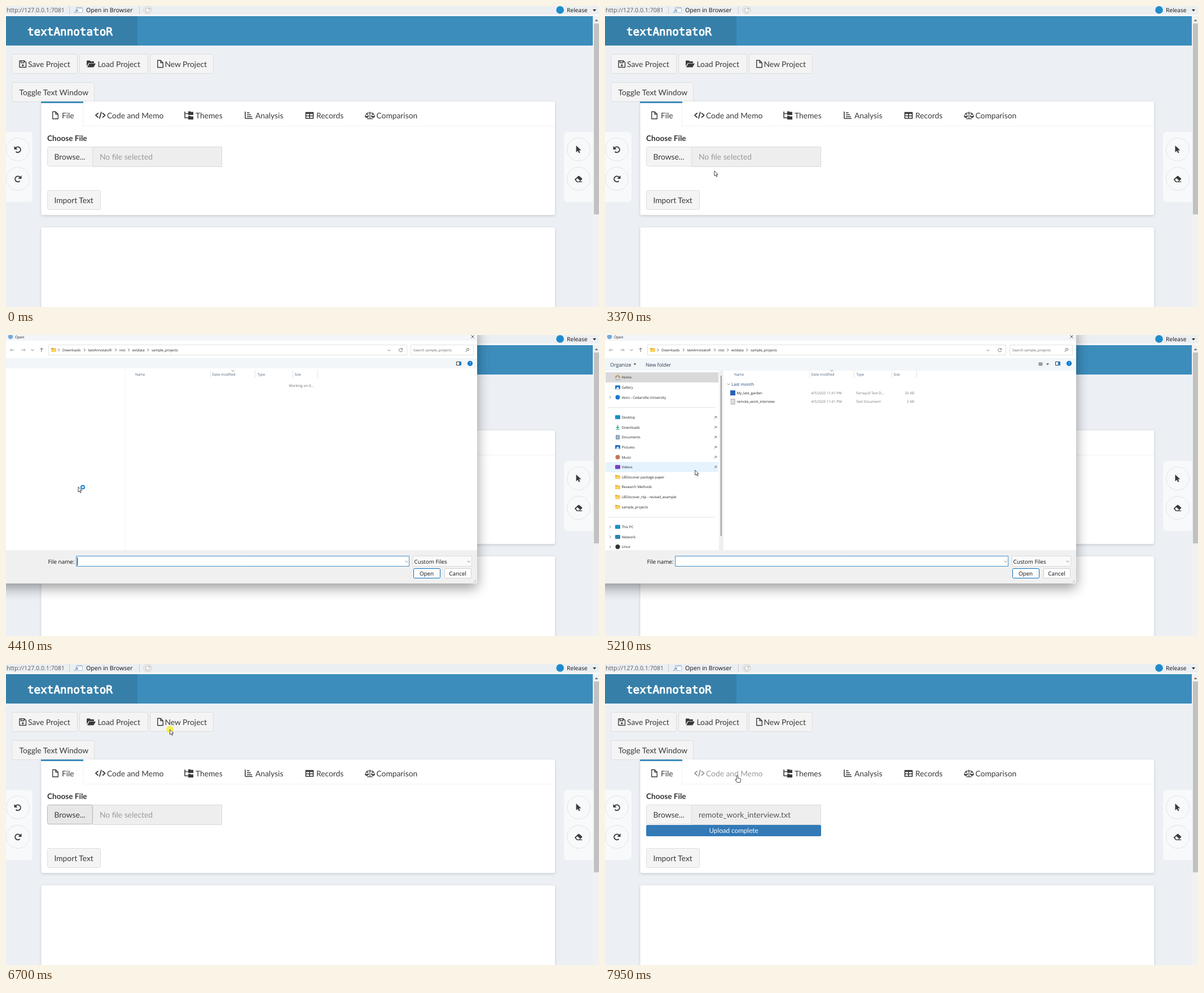
An HTML page with a canvas that plays this animation: 1051x533 px, repeating every 8 s.

```html
<!DOCTYPE html>
<html lang="en">
<head>
<meta charset="utf-8">
<title>textAnnotatoR</title>
<style>
html, body { margin: 0; width: 100%; height: 100%; overflow: hidden; background: #ecf0f5; }
canvas { display: block; width: 1051px; height: 533px; }
</style>
</head>
<body>
<canvas width="1051" height="533"></canvas>
<script>
const ctx = document.querySelector('canvas').getContext('2d');
const LOOP = 8000;
const APP = 'Lato, sans-serif', SYS = '"Open Sans", sans-serif';
const INK = '#3a3a3a', BLUE = '#3c8dbc';

// time, x, y of the pointer tip
const POINTER = [
  [1040, 1037, 526], [1510, 1037, 526], [2060, 777, 467], [2340, 657, 428], [3160, 263, 318],
  [3370, 194, 292], [3860, 128, 269], [5010, 128, 269], [5970, 279.5, 127], [6240, 290.5, 116],
  [7610, 290.5, 116], [7950, 234.5, 197]
];

const SIDEBAR = [
  ['Home', 'house', '#d9822b'], ['Gallery', 'picture', '#1d76c9'],
  ['Veno - Cedarville University', 'disc', '#1a78d0'], null,
  ['Desktop', 'screen', '#1c8fc4'], ['Downloads', 'down', '#1ba57b'], ['Documents', 'sheet', '#7c93ad'],
  ['Pictures', 'picture', '#1d76c9'], ['Music', 'disc', '#c4775c'], ['Videos', 'screen', '#7a3fc0'],
  ['LBDiscover package paper', 'folder'], ['Research Methods', 'folder'],
  ['LBDiscover_nlp - revised_example', 'folder'], ['sample_projects', 'folder'], null,
  ['This PC', 'screen', '#1c8fc4'], ['Network', 'screen', '#2b82b5'], ['Linux', 'disc', '#333']
];

function box(x, y, w, h, fill, stroke, r = 0) {
  ctx.beginPath();
  ctx.roundRect(x, y, w, h, r);
  if (fill) { ctx.fillStyle = fill; ctx.fill(); }
  if (stroke) { ctx.strokeStyle = stroke; ctx.lineWidth = 1; ctx.stroke(); }
}
const disc = (x, y, r, fill, stroke) => box(x - r, y - r, 2 * r, 2 * r, fill, stroke, r);

function text(s, x, y, size = 13.8, color = INK, font = APP, align = 'left', weight = '') {
  ctx.font = `${weight} ${size}px ${font}`;
  ctx.fillStyle = color;
  ctx.textAlign = align;
  ctx.fillText(s, x, y);
}
const sys = (s, x, y, size = 6.2, color = '#222', align) => text(s, x, y, size, color, SYS, align);

function at(x, y, draw) {
  ctx.save();
  ctx.translate(x, y);
  draw();
  ctx.restore();
}
function fill(d, color = INK) {
  ctx.fillStyle = color;
  ctx.fill(new Path2D(d));
}
function line(d, width = 1.4, color = INK) {
  ctx.strokeStyle = color;
  ctx.lineWidth = width;
  ctx.stroke(new Path2D(d));
}
function shadowed(color, blur, dy, draw) {
  ctx.save();
  ctx.shadowColor = color;
  ctx.shadowBlur = blur;
  ctx.shadowOffsetY = dy;
  draw();
  ctx.restore();
}

function button(x, y, w, label, labelX, hot) {
  box(x + .5, y + .5, w - 1, 34, hot ? '#e7e7e7' : '#f4f4f4', hot ? '#b5b5b5' : '#ddd', 3);
  text(label, labelX, y + 22.5);
}
const fileIcon = (x, y) => at(x, y, () => line('M.7.7H6l4.3 4.2V13.3H.7zM6 .7V5h4.3'));

function pointerAt(t) {
  if (t < POINTER[0][0]) return null;
  const i = POINTER.findIndex(k => k[0] > t);
  if (i < 0) return POINTER.at(-1).slice(1);
  const [t0, x0, y0] = POINTER[i - 1], [t1, x1, y1] = POINTER[i];
  const p = (t - t0) / (t1 - t0);
  return [x0 + (x1 - x0) * p, y0 + (y1 - y0) * p];
}
const inside = (p, x, y, w, h) => p && p[0] >= x && p[0] < x + w && p[1] >= y && p[1] < y + h;

function toolbar() {
  box(0, 0, 1051, 18, '#f7f8f9');
  box(0, 0, 1051, 15, '#eceff2');
  sys('http://127.0.0.1:7081', 1, 11, 10.6, '#555');
  sys('Open in Browser', 142, 11, 10.6, '#111');
  box(112, 0, 1, 14, '#c8ccd0');
  box(236, 0, 1, 14, '#c8ccd0');
  box(124.5, 2.5, 11, 9, '#fff', '#aebfd0', 1);
  box(125, 3, 10, 2, '#c5d5e5');
  line('M121 12l6-5m-3.500 0H127v3.500', 1.5, '#7fa7cc');
  disc(251, 7, 6.8, '#f8f8f8', '#c4c4c4');
  line('M254 4.500a4 4 0 1 0 1 3.500M255 3v3h-3', 1.2, '#b5b5b5');
  disc(982, 7, 6.8, '#1e8bcb');
  sys('Release', 994, 11, 10.2, '#111');
  fill('M1040 6h6l-3 3.500z', '#222');
}

function tabs(codeHot) {
  box(62, 169, 75, 3, BLUE);
  box(136, 172, 1, 41, '#f2f2f2');
  box(137, 212, 836, 1, '#f2f2f2');
  fileIcon(82, 186.5);
  text('File', 99, 198.5);
  const ink = codeHot ? '#999' : INK;
  line('M163.500 189.500l-4.500 4 4.500 4M171 189.500l4.500 4-4.500 4M169 187.500l-3.300 12', 1.8, ink);
  text('Code and Memo', 179, 198.5, 13.8, ink);
  line('M317 187v11h6M317 190.500h6', 1.6);
  fill('M323 186.500h3.500l1 1h4.500v5.500h-9zM323 194.500h3.500l1 1h4.500v5.500h-9z');
  text('Themes', 336, 198.5);
  line('M424 187v11q0 1.200 1.200 1.200H437M427 189h4.500M427 192.500h7M427 196h9', 1.6);
  text('Analysis', 442, 198.5);
  line('M531.500 188.500h13v10.500h-13zM538 189v10M531 194.500h14', 1.7);
  fill('M531 188h14v3h-14z');
  text('Records', 550, 198.5);
  line('M645 187v12.500M640 199.700h10M639.500 189.500h11M636.700 195l2.900-5 2.900 5M647.500 195l2.900-5 2.900 5', 1.2);
  fill('M636 195h7q-.5 3-3.500 3t-3.500-3zM647 195h7q-.5 3-3.500 3t-3.500-3z');
  text('Comparison', 656.5, 198.5);
}

function sideTools() {
  box(-6, 223, 53, 124, '#f8f9fa', null, 6);
  box(989, 223, 57, 124, '#f8f9fa', null, 6);
  box(1040, 18, 11, 515, '#f1f1f1');
  box(1042, 31, 9, 338, '#c1c1c1');
  fill('M1043.500 27l3-3.500 3 3.500z', '#777');
  for (const x of [21, 1015]) for (const y of [254, 306]) disc(x, y, 20.5, '#f8f9fa', '#e2e4e6');
  const turn = () => {
    line('M-4.500-2A5 5 0 1 1-3.500 4', 1.8);
    fill('M-6.500-6v6h6z');
  };
  at(21, 254, turn);
  at(21, 306, () => { ctx.scale(-1, 1); turn(); });
  fill('M1010.500 247v12l3-2.600 2 4.200 2-1-2-4h4z');
  fill('M1008.300 306.500l6-5.500q.8-.7 1.600 0l5 4.300q.8.800 0 1.600l-4 3.800h4.300v1.400h-9.500l-3.500-4q-.7-.8.100-1.600z');
  fill('M1010 307.500l2.700-2.500 4.600 4-1.800 1.700h-2.800z', '#f8f9fa');
}

function page(t, p) {
  box(0, 0, 1051, 533, '#ecf0f5');
  toolbar();
  box(0, 18, 1040, 52, BLUE);
  box(0, 18, 233, 52, '#367fa9');
  text('textAnnotatoR', 38, 51.5, 19.3, '#fff', '"DejaVu Sans Mono", monospace');
  ctx.strokeStyle = '#fff';
  ctx.lineWidth = 1;
  ctx.strokeText('textAnnotatoR', 38, 51.5);

  const back = t >= 6870;
  button(10, 85, 117, 'Save Project', 39);
  line('M24 97h8.500l3 3v8.500H24zM26.500 97v3.500h5.500V97');
  disc(29.8, 105, 1.7, INK);
  button(130, 85, 122, 'Load Project', 162.5);
  fill('M143 107v-9.500q0-1 1-1h4.500l1.700 1.500h4.800q1 0 1 1v2h-8.500q-1 0-1.500.900zM144 108.500l3.200-6q.4-.7 1.200-.7H159l-3.300 6q-.4.700-1.200.700z');
  button(255, 85, 113, 'New Project', 281.5, back && inside(p, 255, 85, 113, 35));
  fileIcon(268, 95.5);
  button(10, 135, 147, 'Toggle Text Window', 23.5);

  for (const [y, h] of [[169, 201], [392, 160]])
    shadowed('rgba(0,0,0,.16)', 5, 1.5, () => box(62.5, y, 910.5, h, '#fff', null, 3));
  tabs(back && inside(p, 147, 172, 141, 40));

  text('Choose File', 73, 238.5, 13.6, '#333', APP, 'left', 'bold');
  box(153.5, 249.5, 229, 35, '#eee', '#d6d9de');
  const pressed = !back && (t >= 4000 || inside(p, 73, 250, 81, 35));
  button(73, 249, 81, 'Browse...', 85.5, pressed);
  if (back) {
    text('remote_work_interview.txt', 166, 271.5, 13.8, '#555');
    const u = Math.min(1, (t - 6870) / 600), w = 310 * (1 - (1 - u) ** 3);
    box(73, 285, 310, 20, '#f5f5f5', null, 3);
    ctx.save();
    ctx.beginPath();
    ctx.rect(73, 285, w, 20);
    ctx.clip();
    box(73, 285, 310, 20, '#337ab7', null, 2);
    text('Upload complete', 73 + w / 2, 299, 11.7, '#fff', APP, 'center');
    ctx.restore();
  } else {
    text('No file selected', 166, 271.5, 13.8, '#999');
  }
  button(73, 326, 95, 'Import Text', 85.5);
  sideTools();
}

function smallIcon(kind, x, y, color) {
  at(x, y, () => {
    if (kind === 'folder') {
      fill('M-4.500-3.500h3.500l1 1h4.500v6h-9z', '#e0a526');
      fill('M-4.500-1.500h9v5h-9z', '#fbd160');
    } else if (kind === 'disc') disc(0, 0, 4, color);
    else if (kind === 'house') {
      box(-3, -.5, 6, 4.5, '#e8e8e8', '#8b98a5');
      line('M-4.500 0L0-4 4.500 0', 1.3, color);
    } else if (kind === 'down') line('M0-4v6M-2.500-.5L0 2l2.500-2.500M-3.500 4h7', 1.2, color);
    else if (kind === 'sheet') {
      box(-3.5, -4, 7, 8, color, null, 1);
      line('M-2-2h4M-2 0h4M-2 2h4', .7, '#fff');
    } else {
      box(-4.5, -3.5, 9, 7, color, null, 1);
      if (kind === 'picture') fill('M-3.500 3l3.500-4 3.500 4z', '#fff');
    }
  });
}
const chevron = (x, y, down, color = '#777') =>
  at(x, y, () => line(down ? 'M-2.500-1L0 1.300 2.500-1' : 'M-1-2.300L1.300 0-1 2.300', .9, color));

function sidebar(p) {
  box(202, 63, 8, 318, '#f0f0f0');
  box(205, 72, 1.5, 284, '#858585');
  SIDEBAR.forEach((row, i) => {
    const y = 75 + 17.65 * i;
    if (!row) return box(6, Math.round(y), 190, 1, '#e2e2e2');
    if (i === 0) box(1, 66, 200, 18, '#d9d9d9');
    else if (inside(p, 1, y - 8.8, 200, 17.6)) box(1, y - 8.8, 200, 17.6, '#e5f3ff');
    smallIcon(row[1], 22.5, y, row[2]);
    sys(row[0], 29.5, y + 2.3);
    if (i === 2 || i > 14) chevron(9, y);
    if (i > 3 && i < 10) at(196, y, () => line('M-2.500 2.500L0 0M-1.500-1.500l3 3M0-2.500L2.500 0M-.8-.8L.8-2M.8.800L2-.8', .9, '#777'));
  });
}

function fileRow(y, name, type, size, icon) {
  icon();
  sys(name, 233.5, y + 2.3);
  sys('4/5/2025 11:41 PM', 365.5, y + 2.3, 6.2, '#777');
  sys(type, 445, y + 2.3, 6.2, '#777');
  sys(size, 548, y + 2.3, 6.2, '#777', 'right');
}

function files(t, p) {
  if (t >= 6500) box(213, 110, 337, 16, '#cce8ff');
  else if (inside(p, 213, 110, 337, 16)) box(213, 110, 337, 16, '#e5f3ff');
  chevron(219, 87, true);
  sys('Last month', 224, 90, 7.6, '#24477f');
  fileRow(102.5, 'My_late_garden', 'Fernquill Text D...', '20 KB', () => box(222, 98, 9, 9, '#2b63b8'));
  fileRow(118, 'remote_work_interview', 'Text Document', '2 KB', () => {
    box(223.5, 113.5, 6.5, 9, '#fafafa', '#999');
    line('M225 116h4M225 118h4M225 120h4', .7, '#999');
  });
}

function dialog(t, p) {
  const loaded = t >= 4550;
  shadowed('rgba(0,0,0,.4)', 22, 8, () => box(-20, -20, 855, 460, '#fff', null, 4));
  box(0, 0, 835, 10, '#f3f5f8');
  disc(8, 3, 4.3, '#75aadb');
  sys('Open', 16, 5.5, 6.4);
  line('M824.500 0.500l5 5m0-5l-5 5', .9);

  line('M14.500 26.500h-7m2.500-2.500l-2.500 2.500 2.500 2.500M27 26.500h7m-2.500-2.500l2.500 2.500-2.500 2.500', .9, '#999');
  line('M63 30v-7m-2.500 2.500l2.500-2.500 2.500 2.500', .9, '#555');
  chevron(47, 26.5, true);
  box(75.5, 17.5, 635, 18, '#fff', '#e3e3e3');
  box(717.5, 17.5, 111, 18, '#fff', '#e3e3e3');
  smallIcon('folder', 84.5, 26.5);
  [['Downloads', 100], ['textAnnotatoR', 145.5], ['inst', 201], ['extdata', 224], ['sample_projects', 258]]
    .forEach(([s, x]) => { chevron(x - 6.5, 26.5, false, '#444'); sys(s, x, 29); });
  chevron(679, 27, true);
  line('M702 24.800a3 3 0 1 0 .600 2.500M702.500 23.500v2h-2', .9, '#666');
  sys('Search sample_projects', 722, 29, 6.2, '#666');
  line('M820.500 25.500a2 2 0 1 1-4 0 2 2 0 0 1 4 0M817 27.500l-2.500 2.500', .9, '#555');

  box(0, 41, 835, loaded ? 22 : 18, '#f2f6f9');
  box(798.5, 47.5, 8, 6, '#fff', '#333');
  box(803, 47, 4, 7, '#257dc0');
  disc(822.5, 50.3, 4.6, '#0878c9');
  sys('?', 822.5, 53, 7, '#fff', 'center');

  [['Name', 229], ['Date modified', 365.5], ['Type', 445.5], ['Size', 511.5]]
    .forEach(([s, x]) => sys(s, x, 72.3, 6.2, '#4c607a'));
  for (const x of [362, 441, 508, 552]) box(x, 63, 1, 13, '#e5e5e5');
  chevron(402, 63, true);

  if (loaded) {
    sys('Organize', 9, 55.5, 9, '#26374a');
    fill('M50.500 50.500h5l-2.500 2.800z', '#444');
    sys('New folder', 72, 55.5, 8.8, '#26374a');
    line('M768.500 49.500h7M768.500 51.500h7M768.500 53.500h7', 1, '#444');
    fill('M782 50.500h5l-2.500 2.800z', '#444');
    sidebar(p);
    files(t, p);
  } else {
    box(211, 59, 1, 322, '#f5f5f5');
    sys('Working on it...', 501.5, 91.5, 6.3, '#666');
  }

  box(0, 381, 835, 59, '#f0f0f0', null, [0, 0, 4, 0]);
  sys('File name:', 121.5, 404.5, 9.9, '#111', 'right');
  box(124.5, 391.5, 590, 18, '#fff', '#4a90c8');
  if (t >= 6500) sys('remote_work_interview', 127, 404.5, 9.9, '#111');
  else if (Math.floor((t - 4410) / 530) % 2 === 0) box(126, 394, 1, 14, '#111');
  chevron(710, 401, true);
  box(721.5, 391.5, 104, 18, '#fafafa', '#dcdcdc');
  sys('Custom Files', 723.5, 404.5, 9.8, '#111');
  chevron(820, 401, true);
  box(722.5, 413.5, 47, 17, '#fdfdfd', '#0a6fbd', 2);
  sys('Open', 745.5, 426, 9.8, '#111', 'center');
  box(777.5, 413.5, 47, 17, '#fdfdfd', '#d0d0d0', 2);
  sys('Cancel', 800.5, 426, 9.9, '#111', 'center');
  line('M829 438l4-4M832 438l1-1', 1, '#aaa');
}

function pointer(t, p) {
  const [x, y] = p, open = t >= 4410 && t < 6870;
  if ((t >= 4000 && t < 4200) || (t >= 6500 && t < 6870)) disc(x, y, 6.5, 'rgba(247,238,50,.85)');
  const hand = !open && (inside(p, 73, 250, 81, 35) || inside(p, 255, 85, 113, 35) || inside(p, 147, 172, 141, 40));
  at(x, y, () => {
    const shape = hand
      ? 'M0 0q1.200 0 1.200 1.200V5l4 1q1.200.400 1 2l-.8 4.500H-.8L-3.500 8q-.2-1.500 1.300-.8l1 1v-7Q-1.200 0 0 0z'
      : 'M0 0v9l2.100-1.900 1.500 3.300 1.500-.7-1.500-3.200h2.800z';
    fill(shape, '#fff');
    line(shape, .9, '#333');
    if (t >= 4410 && t < 4680) {
      ctx.strokeStyle = '#1583d6';
      ctx.lineWidth = 2;
      ctx.beginPath();
      ctx.arc(8, .5, 3, 0, 7);
      ctx.stroke();
    }
  });
}

function draw(now) {
  const t = now % LOOP, p = pointerAt(t);
  ctx.textRendering = 'geometricPrecision';
  ctx.lineJoin = 'round';
  page(t, p);
  if (t >= 4410 && t < 6700) {
    ctx.globalAlpha = t < 6640 ? 1 : .45;
    dialog(t, p);
    ctx.globalAlpha = 1;
  }
  if (p) pointer(t, p);
  requestAnimationFrame(draw);
}
requestAnimationFrame(draw);
</script>
</body>
</html>
```
